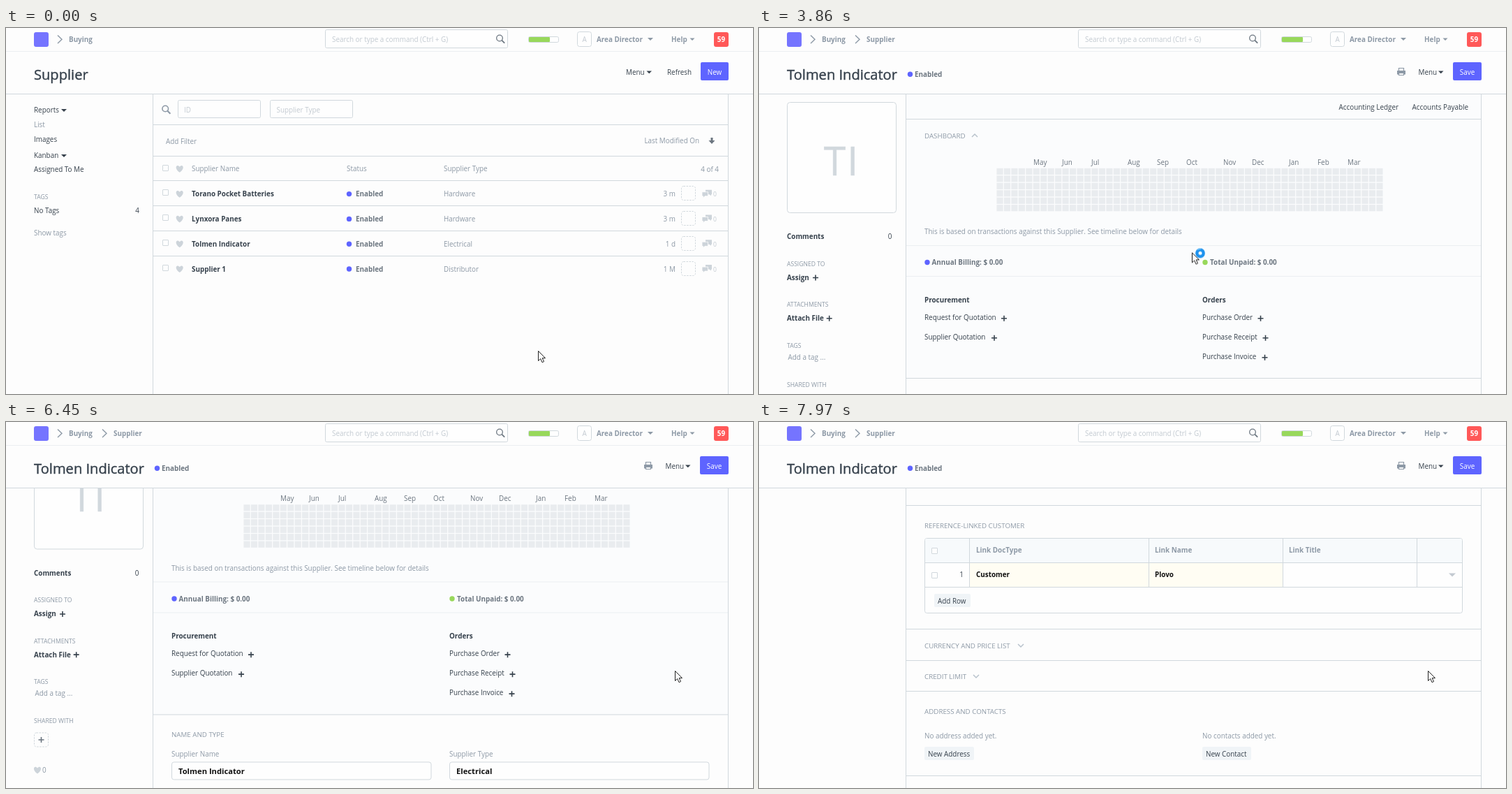
Recreate the animation shown at these times as an HTML page. Size 1070 by 524 pixels, loop 8 s.

```html
<!DOCTYPE html>
<html lang="en">
<head>
<meta charset="utf-8">
<title>Supplier</title>
<style>
html, body { margin: 0; width: 100%; height: 100%; overflow: hidden; background: #fdfdfd; }
svg { display: block; width: 100vw; height: 100vh; }
text { font: 9.9px "Open Sans", "Noto Sans", sans-serif; fill: #8d99a6; white-space: pre; }
.b { font-weight: 700; }
.d { fill: #36414c; }
.m { fill: #6c7680; }
.l { fill: #c3cad1; }
.k { fill: #111; }
.w { fill: #fff; }
.s { font-size: 8.6px; }
.h { font-size: 9.75px; }
.i { font-size: 11.2px; }
.title { font-size: 20.1px; stroke: #36414c; stroke-width: .4; }
.initials { font-size: 57px; letter-spacing: 2px; fill: #d1d8dd; stroke: #d1d8dd; stroke-width: .5; }
.e { text-anchor: end; }
.c { text-anchor: middle; }
.line { stroke: #d1d8dd; fill: none; }
.pale { stroke: #ebeff2; }
.box { stroke: #d1d8dd; fill: #fefefe; }
.dash { stroke: #d1d8dd; fill: none; stroke-dasharray: 2.5 1.5; }
.btn { fill: #f0f4f7; }
.tint { fill: #f7fafc; }
.cell { fill: #fffdf3; }
.blue { fill: #5e64ff; }
.green { fill: #98d85b; }
.logo { fill: #7574ff; }
.badge { fill: #ff5858; }
.panel { fill: #fbfcfd; }
.page { fill: #fdfdfd; }

.list, .form, .tinted, .hover, .link, .warm, .arrow, .hand, .ring {
  animation: 8s step-end infinite;
}
.list { animation-name: list; }
.form { animation-name: form; }
.tinted { animation-name: tinted; }
.hover { animation-name: hover; }
.link { animation-name: link; }
.warm { animation-name: warm; }
.arrow { animation-name: arrow; }
.hand { animation-name: hand; }
.ring { animation-name: ring; }
.scroll { animation: scroll 8s linear infinite; }
.pointer { animation: pointer 8s linear infinite; }

@keyframes list { 0% { visibility: visible } 39.125%, 100% { visibility: hidden } }
@keyframes form { 0% { visibility: hidden } 39.125%, 100% { visibility: visible } }
@keyframes tinted { 0% { opacity: 0 } 14.25%, 100% { opacity: 1 } }
@keyframes hover { 0% { opacity: 0 } 24%, 100% { opacity: 1 } }
@keyframes link {
  0% { text-decoration: none; fill: #36414c }
  26.375%, 100% { text-decoration: underline; fill: #111 }
}
@keyframes warm { 0% { fill: #fefefe } 88.375%, 100% { fill: #fffdf3 } }
@keyframes arrow { 0% { opacity: 1 } 26.375% { opacity: 0 } 33.75%, 100% { opacity: 1 } }
@keyframes hand { 0% { opacity: 0 } 26.375% { opacity: 1 } 33.75%, 100% { opacity: 0 } }
@keyframes ring { 0% { opacity: 0 } 33.75% { opacity: 1 } 63.25%, 100% { opacity: 0 } }
@keyframes scroll {
  0%, 63.25% { transform: translate(0, 0); animation-timing-function: ease-out }
  66.25% { transform: translate(0, -37px) }
  78% { transform: translate(0, -37px); animation-timing-function: ease-in-out }
  83.625% { transform: translate(0, -139px) }
  88.375% { transform: translate(0, -139px); animation-timing-function: ease-in }
  91.7% { transform: translate(0, -487px) }
  92.375% { transform: translate(0, -487px); animation-timing-function: ease-out }
  94.125% { transform: translate(0, -615px) }
  97.125% { transform: translate(0, -615px); animation-timing-function: ease-out }
  99.6%, 100% { transform: translate(0, -686px) }
}
@keyframes pointer {
  0%, 8% { transform: translate(762px, 463px); animation-timing-function: ease-in-out }
  13.3% { transform: translate(72px, 74px) }
  14.25% { transform: translate(84px, 72px) }
  16.25% { transform: translate(84px, 72px); animation-timing-function: ease-in-out }
  26% { transform: translate(316px, 317px) }
  26.375% { transform: translate(316px, 308px) }
  27.5% { transform: translate(322px, 293px) }
  28.75% { transform: translate(318px, 304px) }
  39.125% { transform: translate(318px, 304px); animation-timing-function: ease-in-out }
  44.5% { transform: translate(548px, 315px) }
  47.5% { transform: translate(548px, 315px); animation-timing-function: ease-in-out }
  50.125%, 100% { transform: translate(958px, 357px) }
}
</style>
</head>
<body>
<svg id="stage" viewBox="0 0 1070 524" preserveAspectRatio="none"></svg>
<script>
const GREY = '#8d99a6', DARK = '#36414c';
const text = (x, y, s, cls = '') => `<text x="${x}" y="${y}" class="${cls}">${s}</text>`;
const rect = (x, y, w, h, cls = 'box', r = 2) =>
  `<rect x="${x}" y="${y}" width="${w}" height="${h}" rx="${r}" class="${cls}"/>`;
const path = (d, stroke, width = 1.5, fill = 'none') =>
  `<path d="${d}" stroke="${stroke}" stroke-width="${width}" fill="${fill}"/>`;
const rule = (y, cls = 'line') => `<path d="M211 ${y}H1034" class="${cls}"/>`;
const dot = (x, y, cls = 'blue') => `<circle cx="${x}" cy="${y}" r="3.7" class="${cls}"/>`;
const caret = (x, y, c = DARK, w = 8) => `<path d="M${x} ${y}h${w}l${-w / 2} ${w / 2}z" fill="${c}"/>`;
const plus = (x, y, c = DARK) => path(`M${x - 4} ${y}h8M${x} ${y - 4}v8`, c, 1.6);
const check = (x, y) => rect(x, y, 8, 8, 'box', .5);
const heart = (x, y) =>
  `<path transform="translate(${x} ${y})" d="M0 5C-9 -1 -4 -8 0 -3C4 -8 9 -1 0 5z" fill="#cdd4da"/>`;
const glass = (x, y, w, c) =>
  `<circle cx="${x}" cy="${y}" r="4.3" fill="none" stroke="${c}" stroke-width="${w}"/>` +
  path(`M${x + 3.2} ${y + 3.2}l4 4`, c, w + .5);
const crumb = x => path(`M${x} 10.5l6 5.7-6 5.7`, GREY, 1.4);
const fold = (x, y, dir) => path(`M${x} ${y}l4 ${4 * dir} 4 ${-4 * dir}`, '#b8c2cc', 1.5);
const button = (x, y, w, s) => rect(x, y, w, 19, 'btn') + text(x + 5, y + 13.5, s, 'd');
const group = (cls, ...parts) => `<g class="${cls}">${parts.join('')}</g>`;

const company = 'Tolmen Indicator';

const navbar = [
  rect(40, 6, 21, 21, 'logo', 3),
  crumb(74), text(90, 20, 'Buying', 'b'),
  rect(457.5, 2.5, 261, 26), text(467, 20, 'Search or type a command (Ctrl + G)', 'l'),
  glass(707, 14.5, 1.3, '#6c7680'),
  rect(748.5, 12.5, 43, 8), rect(749, 13, 30, 7, 'green', 1),
  rect(818.5, 5.5, 20, 21, 'box', 3), text(828.5, 20, 'A', 'l c'),
  text(846, 20, 'Area Director', 'b'), caret(919, 14, GREY),
  text(953, 20, 'Help', 'b'), caret(979.5, 14.5, GREY, 7),
  rect(1014, 6, 21, 21, 'badge', 3), text(1024.5, 20, '59', 'w b c'),
  '<path d="M0 33.5H1070" class="line pale"/><path d="M0 94.5H1070" class="line"/>'
];

const sides = '<path d="M210.5 95V524M1034.5 95V524" class="line"/>';

const supplier = (name, kind, age, i) => {
  const y = 237.2 + i * 35.8, base = y + 3.9, top = Math.round(y) + .5;
  const link = i === 2 ? 'b d link' : 'b d';
  return check(224.5, top - 6) + heart(248.7, y + .5) +
    text(266, base, name, link) + dot(491.5, y + .4) +
    text(501, base, 'Enabled', 'b m') + text(627, base, kind) + text(959, base, age, 'e') +
    rect(967.5, top - 11, 20, 20, 'dash', 3) +
    `<path transform="translate(1004 ${y})" fill="#cdd4da"
      d="M-2 -5.5h9v6.5h-1v2l-2.5 -2h-5.5z"/>` +
    `<path transform="translate(1004 ${y})" fill="#cdd4da" stroke="#fdfdfd" stroke-width=".8"
      d="M-7 -2.5h8.5v6h-4.5l-2.5 2.5v-2.5h-1.5z"/>` +
    text(1013, base, '0', 'l s');
};

const listPage = [
  rect(211, 184, 823, 34, 'tint tinted', 0), rect(211, 291, 823, 35, 'tint hover', 0),
  sides,
  text(40, 74, 'Supplier', 'title d'),
  text(888, 66.5, 'Menu', 'd'), caret(917.5, 61.5, DARK, 7.5), text(947, 66.5, 'Refresh', 'd'),
  rect(995, 49, 40, 26, 'blue'), text(1015, 66.5, 'New', 'w c'),
  text(40, 120.5, 'Reports', 'd'), caret(79, 116), text(40, 141.5, 'List'),
  text(40, 162.5, 'Images', 'd'), text(40, 185.5, 'Kanban', 'd'), caret(79, 181),
  text(40, 206.3, 'Assigned To Me', 'd'), text(40, 244.5, 'TAGS', 's'),
  text(40, 265, 'No Tags', 'd'), text(191, 265, '4', 'd e'), text(40, 297, 'Show tags'),
  glass(228.2, 115.5, 1.6, GREY),
  rect(246.5, 103.5, 118, 25), text(255, 120.5, 'ID', 'l'),
  rect(378.5, 103.5, 118, 25), text(387.5, 120.5, 'Supplier Type', 'l'),
  rect(224, 152, 55, 19, 'btn tinted'), rect(1002, 152, 19, 19, 'btn tinted'),
  text(229, 165.7, 'Add Filter'), text(993, 165.2, 'Last Modified On', 'e'),
  '<path d="M1009.5 157h3v4h3l-4.5 5-4.5-5h3z" fill="#6c7680"/>',
  check(224.5, 196.5), heart(248.7, 201.7),
  text(266, 205.3, 'Supplier Name'), text(488, 205.3, 'Status'),
  text(627, 205.3, 'Supplier Type'), text(1021, 205.8, '4 of 4', 'e'),
  ...[138.5, 183.5, 218.5, 254.5, 290.5, 326.5].map(y => rule(y)),
  supplier('Torano Pocket Batteries', 'Hardware', '3 m', 0),
  supplier('Lynxora Panes', 'Hardware', '3 m', 1),
  supplier(company, 'Electrical', '1 d', 2),
  supplier('Supplier 1', 'Distributor', '1 M', 3)
];

const sidebar = [
  rect(40.5, 106.5, 156, 158, 'box', 4), text(118.5, 211, 'TI', 'initials c'),
  text(40, 302.3, 'Comments', 'b d'), text(190.5, 302.3, '0', 'd e'),
  text(40, 340.5, 'ASSIGNED TO', 's'), text(40, 361, 'Assign', 'b d'), plus(81, 357.5),
  text(40, 399.3, 'ATTACHMENTS', 's'), text(40, 419.3, 'Attach File', 'b d'), plus(100.7, 415.7),
  text(40, 457.5, 'TAGS', 's'), text(41.5, 475, 'Add a tag ...'),
  text(40, 513.5, 'SHARED WITH', 's'), rect(40.5, 527.5, 20, 20, 'dash', 3), plus(50.5, 537.5, '#6c7680'),
  heart(45, 581), text(52, 585, '0'),
  text(40, 626, '<tspan class="b">Devon Hask</tspan> edited this'), text(40, 641, 'a day ago'),
  text(40, 682, '<tspan class="b">You</tspan> created this'), text(40, 697, 'a day ago')
];

const months = { May: 393, Jun: 434, Jul: 476, Aug: 528, Sep: 570, Oct: 612,
  Nov: 665, Dec: 706, Jan: 759, Feb: 800, Mar: 843 };
let heatmap = '';
for (let col = 0; col < 53; col++)
  for (let row = 0; row < 6; row++)
    heatmap += `<rect x="${340.4 + col * 10.46}" y="${200.8 + row * 10.46}" width="9.2" height="9.2" fill="#e9ecef"/>`;

const action = (x, y, s, px) => text(x, y, s, 'd') + plus(px, y - 2);
const field = (x, y, label, value, cls = 'i d', box = 'box') =>
  text(x, y, label) + rect(x + .5, y + 7.5, 371.5, 25, box, 3) + text(x + 10, y + 25, value, cls);

const dashboard = [
  rect(211, 95, 823, 407, 'panel', 0),
  text(916, 116.5, 'Accounting Ledger', 'd e'), text(1016, 116.5, 'Accounts Payable', 'd e'),
  rule(130.5), text(237, 157.5, 'DASHBOARD', 'h'), fold(305, 156, -1),
  ...Object.entries(months).map(([m, x]) => text(x, 195.7, m, 'm')), heatmap,
  text(237, 295.3, 'This is based on transactions against this Supplier. See timeline below for details'),
  rule(311.5, 'line pale'), rule(355.5, 'line pale'),
  dot(241, 335.5), text(247.5, 339.2, 'Annual Billing: $ 0.00', 'b m'),
  dot(639, 335.5, 'green'), text(646, 339.2, 'Total Unpaid: $ 0.00', 'b m'),
  text(237, 393, 'Procurement', 'b d'), text(635, 393, 'Orders', 'b d'),
  action(237, 417.7, 'Request for Quotation', 351), action(237, 445.7, 'Supplier Quotation', 337),
  action(635, 417.7, 'Purchase Order', 718.5), action(635, 445.7, 'Purchase Receipt', 725.5),
  action(635, 473.7, 'Purchase Invoice', 724.5)
];

const details = [
  rule(501.5), text(237, 534, 'NAME AND TYPE', 'h'),
  field(237, 562, 'Supplier Name', company, 'i b k', 'box warm'),
  field(635, 562, 'Supplier Type', 'Electrical', 'i b k', 'box warm'),
  field(237, 618, 'Country', 'United States'), field(635, 618, 'Print Language', 'en'),
  field(237, 674, 'Tax ID', ''),
  check(636.5, 665.5), text(654.5, 674, 'Disabled', 'd'),
  ...['Warn RFQs', 'Warn POs', 'Prevent RFQs', 'Prevent POs'].map((s, i) =>
    rect(636, 692 + i * 26.1, 9, 9, 'btn', 1) + text(654, 700.3 + i * 26.1, s, 'd')),
  rule(805.5), text(237, 837.5, 'REFERENCE-LINKED CUSTOMER', 'h'),
  rect(237.5, 852.5, 770, 107, 'box', 3), rect(238, 853, 769, 34, 'tint', 2),
  rect(302, 888, 448, 34, 'cell', 0),
  '<path d="M238 887.5H1007M238 922.5H1007M301.5 853V922M558.5 853V922M750.5 853V922M942.5 853V922" class="line"/>',
  check(247.5, 866.5), check(247.5, 901.5),
  text(311, 873, 'Link DocType', 'b'), text(567, 873, 'Link Name', 'b'), text(759, 873, 'Link Title', 'b'),
  text(293, 908.3, '1', 'd e'), text(311, 908.3, 'Customer', 'b k'), text(567, 908.3, 'Plovo', 'b k'),
  caret(988, 902.5, '#c3cad1', 10), button(251, 932, 52, 'Add Row'),
  rule(982.5), text(237, 1009.5, 'CURRENCY AND PRICE LIST', 'h'), fold(371, 1004, 1),
  rule(1027.5), text(237, 1054, 'CREDIT LIMIT', 'h'), fold(307, 1048, 1),
  rule(1071.5), text(237, 1103.5, 'ADDRESS AND CONTACTS', 'h'),
  text(237, 1138.5, 'No address added yet.'), text(635, 1138.5, 'No contacts added yet.'),
  button(237, 1151, 71, 'New Address'), button(635, 1151, 70, 'New Contact'),
  rule(1192.5)
];

const formHead = [
  rect(0, 0, 1070, 95, 'page', 0),
  crumb(138), text(154, 20, 'Supplier', 'b'),
  text(40, 74, company, 'title d'), dot(216.5, 66.3), text(223, 69.8, 'Enabled', 'b m'),
  path('M916.5 61v-3.5h7v3.5M916.5 64.5h7v3h-7z', GREY, 1.2),
  `<path d="M914 61h12v5.5h-2v-2.5h-8v2.5h-2z" fill="${GREY}"/>`,
  text(944.5, 66.5, 'Menu', 'd'), caret(973, 61.5, DARK, 7.5),
  rect(994, 49, 41, 26, 'blue'), text(1014.5, 66.5, 'Save', 'w c')
];

const pointer = [
  `<path class="arrow" d="M.5 -.5v14l3.2-3 2.3 5.2 2.5-1.1-2.3-5h4.3z" fill="#fff" stroke="#222" stroke-linejoin="round"/>`,
  `<path class="hand" d="M-1.5 1q1.5-2 3 0v5l4.5 1q2 .6 2 2.5l-.8 4-1.2 3h-6.5l-1.5-3-3.5-4q-.6-2 1.5-1.5l2.5 2z" fill="#fff" stroke="#222" stroke-linejoin="round"/>`,
  `<g class="ring"><circle cx="12" cy="0" r="4.7" fill="#fff" stroke="#1f93ee" stroke-width="4.4"/>` +
    `<path d="M8 -4.5A6 6 0 0 1 13 -5.9" fill="none" stroke="#6cc0fa" stroke-width="1.5"/></g>`
];

document.getElementById('stage').innerHTML =
  group('list', ...listPage) +
  group('form', group('scroll', ...sidebar, ...dashboard, ...details), sides, ...formHead) +
  group('', ...navbar) +
  group('pointer', ...pointer);
</script>
</body>
</html>
```
